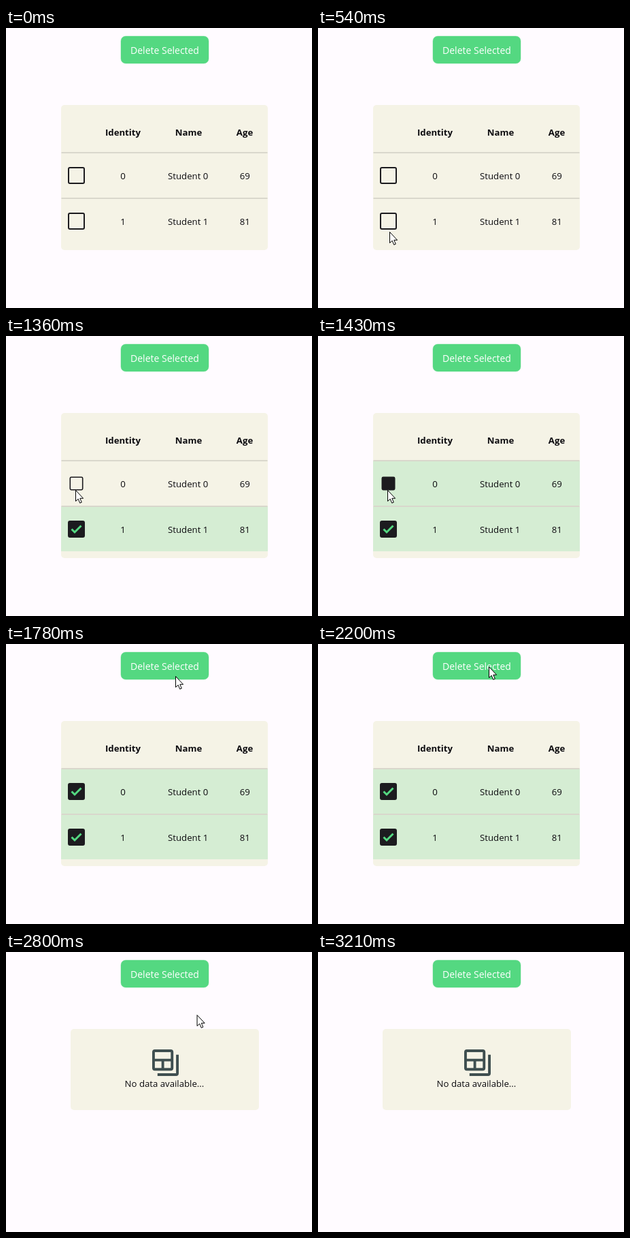
Animation of 450 by 411 pixels, one loop 4.01 s. Source, as an HTML page:

```html
<!DOCTYPE html>
<html lang="en">
<head>
<meta charset="utf-8">
<title>Table row selection</title>
<style>
  html, body { margin: 0; width: 100%; height: 100%; overflow: hidden; background: #fffbff; }
  svg { display: block; width: 450px; height: 411px; }
  text { font: 13.2px "Open Sans", "Noto Sans", sans-serif; text-anchor: middle; fill: #0c0b0f; }
  text.head { font-weight: 700; }
  text.label { font-size: 14px; fill: #fff; }
  .button { fill: #54d881; stroke: #54d881; stroke-opacity: .45; }
  .panel { fill: #f5f3e6; }
  .line { fill: #d9d7cc; }
  .selected { fill: #d5edd3; }
  .box { stroke: #1c1b1f; stroke-width: 2; }
  .check { fill: none; stroke: #54d881; stroke-width: 3; }
</style>
</head>
<body>
<svg viewBox="0 0 450 411">
  <rect class="button" x="169" y="12" width="129" height="40" rx="7"/>
  <text class="label" x="233.5" y="38">Delete Selected</text>
  <g id="table">
    <rect class="panel" x="81" y="113" width="304" height="213" rx="5"/>
    <text class="head" x="172" y="158">Identity</text>
    <text class="head" x="268.5" y="158">Name</text>
    <text class="head" x="351" y="158">Age</text>
    <g id="rows"></g>
  </g>
  <g id="empty">
    <rect class="panel" x="95" y="113" width="277" height="119" rx="5"/>
    <path transform="translate(211.1 139.1) scale(1.95)" fill="#3f4f50" fill-rule="evenodd"
      d="M20 6v14H6v2h14a2 2 0 0 0 2-2V6zM16 2H4a2 2 0 0 0-2 2v12a2 2 0 0 0 2 2h12a2 2 0 0 0 2-2V4a2 2 0 0 0-2-2zM9 16H4v-5h5zM16 16h-5v-5h5zM16 9H4V4h12z"/>
    <text x="233" y="198">No data available...</text>
  </g>
  <path id="cursor" d="M.5 .5V16.5L4.2 13.2 6.7 19.2 9.3 18.1 6.8 12.3H11.6Z" fill="#fff" stroke="#000"/>
</svg>
<script>
  const LOOP = 4010, START = 248, TICK = 68.8;
  const DELETE_TICK = 29, EXIT_TICK = 43;

  // Cursor stops: the tip eases to (x, y) between two ticks
  const origin = { x: 192, y: 361 };
  const moves = [
    { from: 0, to: 4, x: 105, y: 299 },
    { from: 4, to: 7, x: 101, y: 271 },
    { from: 10, to: 16, x: 102, y: 226 },
    { from: 18, to: 22, x: 249, y: 47 },
    { from: 22, to: 25, x: 251, y: 33 },
    { from: 35, to: EXIT_TICK, x: 440, y: 411 }
  ];

  const $ = id => document.getElementById(id);
  const show = (el, on) => el.setAttribute("visibility", on ? "inherit" : "hidden");
  const clamp = u => Math.min(1, Math.max(0, u));
  const ease = u => u * u * (3 - 2 * u);

  // press: tick of the mouse press on the row's checkbox
  const rows = [
    { top: 182, age: 69, press: 16 },
    { top: 249, age: 81, press: 8 }
  ];

  rows.forEach((row, i) => {
    const { top, age } = row, base = top + 40;
    $("rows").insertAdjacentHTML("beforeend", `<g>
      <rect class="selected" x="81" y="${top + 1}" width="304" height="66"/>
      <rect class="line" x="81.5" y="${top}" width="303" height="2"/>
      <g class="mark">
        <rect class="box" x="-11.5" y="-11.5" width="23" height="23" rx="2"/>
        <path class="check" d="M-7 0L-2.5 4.5 7 -5"/>
      </g>
      <text x="172" y="${base}">${i}</text>
      <text x="267.7" y="${base}">Student ${i}</text>
      <text x="351.3" y="${base}">${age}</text>
    </g>`);
    const g = $("rows").lastElementChild;
    for (const part of ["selected", "mark", "box", "check"]) row[part] = g.querySelector("." + part);
  });

  function drawRow(row, tick) {
    const since = tick - row.press;
    const on = since >= 1;
    const scale = since < 0 ? 1 : 0.8 + 0.2 * clamp((since - 1) / 2);
    show(row.selected, on);
    show(row.check, since >= 2);
    row.box.setAttribute("fill", on ? "#1c1b1f" : "none");
    row.mark.setAttribute("transform", `translate(103.5 ${row.top + 34.5}) scale(${scale})`);
  }

  function drawCursor(tick) {
    let { x, y } = origin;
    for (const move of moves) {
      const u = ease(clamp((tick - move.from) / (move.to - move.from)));
      x += (move.x - x) * u;
      y += (move.y - y) * u;
    }
    show($("cursor"), tick >= 0 && tick < EXIT_TICK);
    $("cursor").setAttribute("transform", `translate(${x} ${y})`);
  }

  function draw(now) {
    const tick = Math.floor((now % LOOP - START) / TICK);
    rows.forEach(row => drawRow(row, tick));
    show($("table"), tick < DELETE_TICK);
    show($("empty"), tick >= DELETE_TICK);
    drawCursor(tick);
  }

  const begin = performance.now();
  function frame() {
    draw(performance.now() - begin);
    requestAnimationFrame(frame);
  }
  frame();
</script>
</body>
</html>
```
